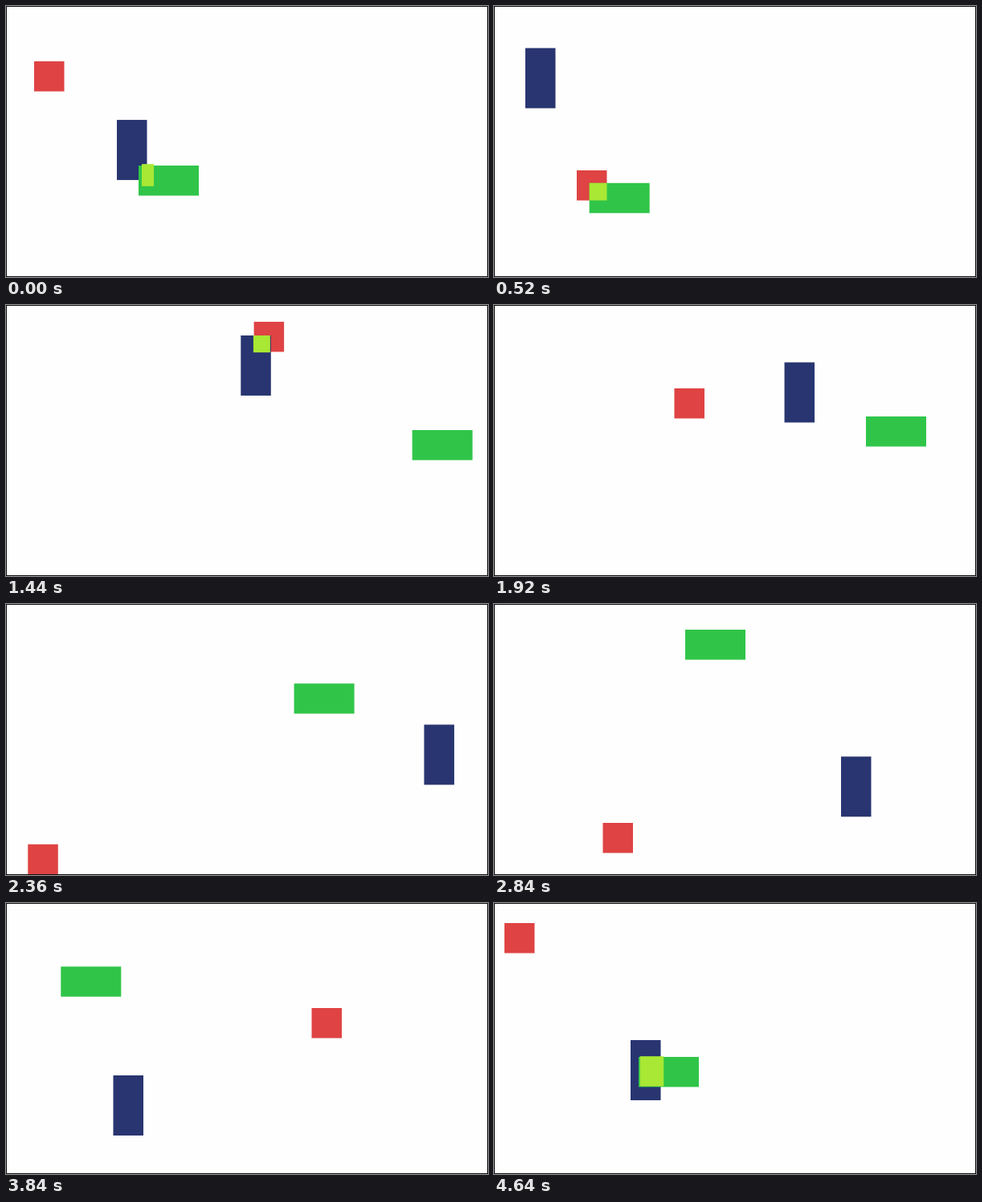
These frames come from a looping animation (600x338 px, 4680 ms). An HTML page with a canvas:

```html
<!DOCTYPE html>
<html>
<head>
<meta charset="utf-8">
<style>
  html, body { margin: 0; overflow: hidden; background: #fefefe; }
  canvas { display: block; }
</style>
</head>
<body>
<canvas id="stage" width="600" height="338"></canvas>
<script>
const ctx = document.getElementById('stage').getContext('2d');
const LOOP = 4680, STEP = 40, MOVE = 280, LAG = 8;

const boxes = [
  { w: 37.5, h: 37.5, color: '#df4343' },
  { w: 37.5, h: 75, color: '#283570' },
  { w: 75, h: 37.5, color: '#30c549' }
];

// Departure time, then x, y of the red, blue and green box.
const stops = [
  [600, 103, 205, 39, 52.5, 118.7, 220.8],
  [1190, 170.3, 165.5, 108, 36, 239, 211.3],
  [1802, 309.3, 20.2, 293.2, 38, 507, 155.7],
  [2320, 26, 300, 521.5, 150, 360, 100],
  [2880, 135.5, 273, 432, 190.3, 238, 32],
  [3440, 436.5, 201, 185.2, 217.2, 71.7, 36.8],
  [4000, 380.5, 131, 133.5, 215, 68.3, 79.3],
  [4560, 3.75, 6.5, 183.5, 183.2, 186.3, 189]
];

const ease = p => p < 0.5 ? 4 * p ** 3 : 1 - 4 * (1 - p) ** 3;

function layout(time) {
  const t = time < stops[0][0] ? time + LOOP : time;
  const i = stops.findLastIndex(s => s[0] <= t);
  const from = stops[i], to = stops[(i + 1) % stops.length];
  const s = ease(Math.min(1, (t - from[0]) / MOVE));
  const at = n => from[n] + (to[n] - from[n]) * s;
  return boxes.map((b, n) => ({ ...b, x: at(2 * n + 1), y: at(2 * n + 2) }));
}

function drawOverlap(a, b) {
  const x = Math.max(a.x, b.x), y = Math.max(a.y, b.y);
  const w = Math.min(a.x + a.w, b.x + b.w) - x;
  const h = Math.min(a.y + a.h, b.y + b.h) - y;
  if (w <= 0 || h <= 0) return;
  ctx.fillStyle = '#a9e834';
  ctx.fillRect(x, y, w, h);
}

function draw(now) {
  const t = Math.floor(now % LOOP / STEP) * STEP;
  ctx.fillStyle = '#fefefe';
  ctx.fillRect(0, 0, 600, 338);
  for (const b of layout(t)) {
    ctx.fillStyle = b.color;
    ctx.fillRect(b.x, b.y, b.w, b.h);
  }
  // The overlap highlight trails the boxes slightly.
  const [red, blue, green] = layout(t - LAG);
  drawOverlap(red, blue);
  drawOverlap(red, green);
  drawOverlap(blue, green);
  ctx.strokeStyle = '#111';
  ctx.strokeRect(0.5, 0.5, 599, 337);
}

const start = performance.now();
function tick() {
  draw(performance.now() - start);
  requestAnimationFrame(tick);
}
tick();
</script>
</body>
</html>
```
